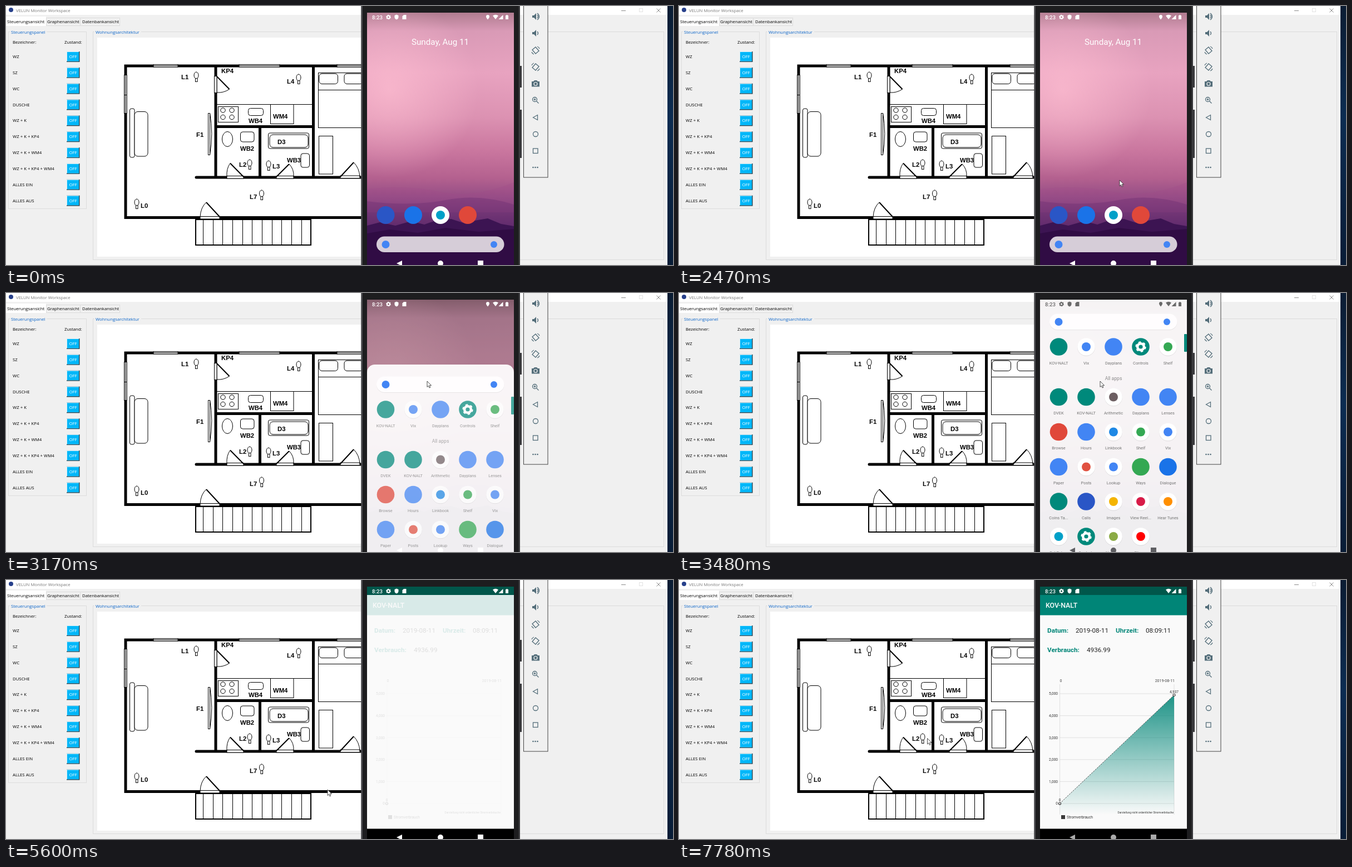
Write an HTML page that moves like this. It is 1199x467 px and loops after 8000 ms.

```html
<!DOCTYPE html>
<html lang="de">
<head>
<meta charset="utf-8">
<style>
html, body { margin: 0; width: 100%; height: 100%; overflow: hidden; background: #f0f0f0; }
svg { display: block; }
.ui { font-family: "Open Sans", sans-serif; }
.plan { font: bold 11.3px "Liberation Sans", sans-serif; }
.os { font-family: Roboto, sans-serif; }
</style>
</head>
<body>
<script>
const text = (x, y, s, size, fill = '#000', extra = '') =>
  `<text x="${x}" y="${y}" font-size="${size}" fill="${fill}" ${extra}>${s}</text>`;
const rect = (x, y, w, h, fill = 'none', extra = '') =>
  `<rect x="${x}" y="${y}" width="${w}" height="${h}" fill="${fill}" ${extra}/>`;
const circle = (x, y, r, fill = 'none', extra = '') =>
  `<circle cx="${x}" cy="${y}" r="${r}" fill="${fill}" ${extra}/>`;
const path = (d, fill = 'none', extra = '') => `<path d="${d}" fill="${fill}" ${extra}/>`;
const group = (attrs, ...parts) => `<g ${attrs}>${parts.flat().join('')}</g>`;
const range = n => [...Array(n).keys()];
const gradient = (id, y1, y2, stops) =>
  `<linearGradient id="${id}" gradientUnits="userSpaceOnUse" x1="0" x2="0" y1="${y1}" y2="${y2}">` +
  stops.map(([y, c, a = 1]) =>
    `<stop offset="${(y - y1) / (y2 - y1)}" stop-color="${c}" stop-opacity="${a}"/>`).join('') +
  '</linearGradient>';
const MIDDLE = 'text-anchor="middle"', END = 'text-anchor="end"';

function desktopWindow() {
  const rows = ['WZ', 'SZ', 'WC', 'DUSCHE', 'WZ + K', 'WZ + K + KP4', 'WZ + K + WM4',
    'WZ + K + KP4 + WM4', 'ALLES EIN', 'ALLES AUS'];
  const border = 'stroke="#dcdcdc"';
  return group('class="ui"',
    rect(0, 0, 1199, 467, '#f0f0f0'), rect(0, 0, 1189, 16, '#fff'),
    rect(1189, 0, 10, 467, 'url(#desk)'),
    circle(9, 7, 4, '#27408b'),
    text(18, 11, 'VELUN Monitor Workspace', 7.8, '#777'),
    path('M1106 8.5h8M1169.5 4.5l7 7m0-7l-7 7', 'none', 'stroke="#8a8a8a"'),
    rect(1138.5, 4.5, 6, 6, 'none', 'stroke="#e2e2e2"'),
    rect(72.5, 21.5, 61, 14, '#f0f0f0', border), rect(133.5, 21.5, 71, 14, '#f0f0f0', border),
    rect(0, 19, 72, 17, '#fff'),
    text(2, 30.5, 'Steuerungsansicht', 7.8), text(74, 30.5, 'Graphenansicht', 7.8),
    text(137, 30.5, 'Datenbankansicht', 7.8),
    rect(4.5, 46.5, 140, 319, 'none', border), rect(156.5, 46.5, 1026, 411, 'none', border),
    rect(7, 42, 66, 8, '#f0f0f0'), rect(159, 42, 84, 8, '#f0f0f0'),
    text(9, 49.5, 'Steuerungspanel', 7.8, '#0a64c8'), text(161, 49.5, 'Wohnungsarchitektur', 7.8, '#0a64c8'),
    text(12, 68, 'Bezeichner:', 7.8), text(105, 68, 'Zustand:', 7.8),
    rows.map((name, i) => {
      const y = 91 + i * 28.85;
      return text(12, y + 3, name, 7.8) + rect(109, y - 9, 23.5, 19, '#2a4a58') +
        rect(109, y - 9, 22, 17.5, '#cdeefa') + rect(110, y - 8, 21, 16.5, '#00b7f9') +
        text(120.5, y + 3, 'OFF', 7.8, '#fff', MIDDLE);
    }),
    rect(164, 57, 620, 395, '#fff'));
}

function floorPlan() {
  const lamp = ([x, y]) => `<ellipse cx="${x}" cy="${y}" rx="4" ry="6"/>` + rect(x - 1.5, y + 5.5, 3.5, 6, '#fff');
  const box = (x, y, w, h, r = 0) => rect(x, y, w, h, '#fff', `rx="${r}"`);
  const lamps = [[342, 125], [526, 129], [438, 283], [472, 285], [459.5, 338], [235, 354]];
  const labels = [['KP4', 387, 121], ['L1', 315, 132], ['L4', 505, 140], ['WB4', 436, 211], ['WM4', 480, 203],
    ['F1', 342, 236], ['WB2', 421, 261], ['D3', 488, 249], ['WB3', 505, 282], ['L2', 419, 290],
    ['L3', 479, 293], ['L7', 438, 348], ['L0', 242, 364]];
  return group('stroke="#000"',
    path('M215 108H650M215 105.5V384M212.5 381.5H650M377 108V309M377 217.5H553M456.5 217V309M552.5 108V309', 'none', 'stroke-width="5"'),
    path('M342 309H650', 'none', 'stroke-width="5" stroke-linecap="round"'),
    group('fill="#fff"',
      [[265, 44], [419, 73], [595, 60]].map(([x, w]) => box(x, 105.5, w, 4.5) + path(`M${x} 107.5h${w}`)),
      box(212.5, 124.5, 4.5, 69), path('M214.5 124v69M212 160.5h5'),
      box(374.5, 126.5, 4.5, 30), box(397, 306.5, 30, 4.5), box(486, 306.5, 31, 4.5),
      box(601, 306, 35, 4.5), box(349, 379.5, 35, 4.5)),
    path('M379 127L401.5 150M427 308L403 283.5M486 308L509 285M601 308L625 282M384 380L360 354', 'none', 'stroke-width="2"'),
    path('M401.5 150Q391 157 379 156M403 283.5Q396 293 397 308M509 285Q518 294 517 308M625 282Q635 292 636 308M360 354Q350 363 349 380'),
    group('fill="#fff"',
      box(222.5, 185, 8.5, 88, 3), box(231, 190.5, 24, 80.5, 6),
      box(363.5, 193.5, 3, 75), path('M366.5 193Q373 230 366.5 268'),
      path('M379 177.5H550'), box(381.5, 181.5, 36, 28),
      [[390, 188], [406, 188], [390, 200.5], [406, 200.5]].map(([x, y]) => circle(x, y, 4.2)),
      box(435.5, 184.5, 27, 13, 4), box(475.5, 177.5, 41.5, 35),
      box(561.5, 120.5, 90, 99), path('M561 151.5H650'), box(563, 122, 33.5, 18.5, 5), box(608, 122, 33.5, 18.5, 5),
      box(562.5, 234.5, 25, 68.5),
      '<ellipse cx="398" cy="240" rx="9.5" ry="13.5"/>', box(421.5, 227, 24.5, 18, 4),
      box(471.5, 229, 73, 28, 3), box(474, 232, 69, 23, 6), box(530, 266, 15.5, 25, 4),
      lamps.map(lamp)),
    rect(341, 385, 207, 46, '#fff', 'stroke-width="2"'),
    range(11).map(i => path(`M${354.5 + Math.round(i * 17.65)} 385V431`))) +
    group('class="plan"', labels.map(([s, x, y]) => `<text x="${x}" y="${y}">${s}</text>`));
}

const gear = (x, y, r, fill) => circle(x, y, r * .65, 'none', `stroke="${fill}" stroke-width="${r * .5}"`) +
  circle(x, y, r * .9, 'none', `stroke="${fill}" stroke-width="${r * .35}" stroke-dasharray="${r * .4712}"`);

function sideBar() {
  const speaker = y => path(`M946 ${y - 2}h3l4-4v12l-4-4h-3z`, '#546e7a');
  const turn = (y, flip) => group(`transform="translate(952 ${y}) scale(${flip} 1)" fill="none" stroke="#546e7a" stroke-width="1.3"`,
    path('M-6 -1L0 -6L6 1L0 6Z'), path('M-7 3Q-6 6 -3 7M7 -3Q6 -6 3 -7'));
  return rect(930.5, -1, 43.5, 310, '#f0f0f0', 'stroke="#444"') +
    speaker(19) + path('M955 16q3 3 0 6M955 13q7 6 0 12', 'none', 'stroke="#546e7a" stroke-width="1.4"') +
    speaker(49) + path('M955 46q3 3 0 6', 'none', 'stroke="#546e7a" stroke-width="1.4"') +
    turn(80, 1) + turn(110, -1) +
    path('M945 136h3l2-2h4l2 2h3v9.500h-14z', '#546e7a') + circle(952, 140.500, 3, '#546e7a', 'stroke="#f0f0f0" stroke-width="1.200"') +
    group('fill="none" stroke="#546e7a" stroke-width="1.3"',
      circle(950.500, 168.500, 4), path('M953.500 171.500l4 4M948.500 168.500h4M950.500 166.500v4'),
      path('M947.500 201l8-4.500v9z'), circle(952, 231, 4.500), rect(947.500, 257, 8.500, 8.500)) +
    [947.500, 951.500, 955.500].map(x => circle(x, 291, 1.3, '#546e7a')).join('');
}

const columns = [682.5, 732, 781, 830, 879];
const TEAL = '#00897b', BLUE = '#4285f4';
// Each launcher entry: label, badge colour, optional inner dot colour.
const bot = ['KOV-NALT', TEAL], vid = ['Vix', '#fff', BLUE], days = ['Dayplans', BLUE],
  tune = ['Controls', TEAL, 'gear'], shelf = ['Shelf', '#fff', '#34a853'];
const rows = [
  [97, [bot, vid, days, tune, shelf]],
  [187.5, [['DVEK', TEAL], bot, ['Arithmetic', '#fff', '#6d5f62'], days, ['Lenses', BLUE]]],
  [250.5, [['Browse', '#e0483a'], ['Hours', BLUE], ['Linkbook', '#fff', '#1e88e5'], shelf, vid]],
  [313.5, [['Paper', BLUE], ['Posts', '#fff', '#e15241'], ['Lookup', '#fff', BLUE], ['Ways', '#34a853'], ['Dialogue', '#1a73e8']]],
  [376, [['Coins Ta...', TEAL], ['Calls', '#2a56c6'], ['Images', '#fff', '#f4b400'], ['View Reel...', '#fff', '#d81b48'], ['Hear Tunes', '#fff', '#ff8f00']]],
  [439, [['Get Extras', '#fff', '#00a0c8'], tune, ['Netpane', '#fff', '#8bab45'], ['Clipvue', '#fff', '#f00']]]
];

function launcherIcon([label, badge, dot], x, y, id = '') {
  const inner = dot === 'gear' ? gear(x, y, 9, '#fff') : dot ? circle(x, y, 8, dot) : '';
  const shade = badge === '#fff' ? circle(x, y + .7, 16, '#000', 'opacity=".1"') : '';
  return group(id, shade, circle(x, y, 15.8, badge), inner,
    text(x, y + 31.5, label, 7.4, '#757575', MIDDLE));
}

function home() {
  const dock = ['#2a56c6', '#1a73e8', '#fff', '#e0483a'];
  return rect(649, 12, 264, 455, 'url(#sky)') + rect(649, 12, 264, 455, 'url(#glow)') +
    path('M649 330Q720 322 780 335T913 318V372H649Z', '#a04a86', 'opacity=".25"') +
    path('M649 352Q730 362 790 350T913 358V400H649Z', '#6d2f70', 'opacity=".4"') +
    path('M649 396L672 390L700 396L728 388L752 394L775 386L800 384L822 391L848 386L866 383L890 393L913 397V467H649Z', '#3c1452') +
    path('M649 410L690 403L740 409L790 400L850 407L913 402V467H649Z', '#2d0b42', 'opacity=".8"') +
    rect(649, 12, 264, 455, '#000', 'id="scrim"') +
    group('id="date"', text(780.5, 70, 'Sunday, Aug 11', 15.2, '#fff', MIDDLE)) +
    group('id="dock"', dock.map((c, i) => circle(columns[i], 377, 16, c)), circle(columns[2], 377, 8, '#00a0c8'));
}

function drawer() {
  return rect(649, 12, 264, 520, '#fff', 'id="panel"') +
    group('id="search"', rect(666, 38.5, 229.500, 28.500, '#000', 'rx="14.250" opacity=".07"'),
      rect(666, 37.500, 229.500, 28.500, '#fff', 'rx="14.250" id="pill"'),
      circle(682.500, 52, 7, BLUE), circle(877, 52, 6, BLUE)) +
    group('id="apps"', rows.map(([y, list], r) =>
      list.map((app, c) => launcherIcon(app, columns[c], y, r + c ? '' : 'id="first"'))),
      text(781, 156.5, 'All apps', 8.6, '#8a8a8a', MIDDLE), rect(908, 74, 5, 32, TEAL, 'rx="1"'));
}

function app() {
  const ys = range(6).map(i => 403 - i * 39.6);
  return rect(649, 12, 264, 455, '#fafafa') + rect(649, 12, 264, 15, '#00574b') + rect(649, 448.5, 264, 19, '#000') +
    group('id="content"',
      rect(649, 27, 264, 36.5, '#008577'),
      text(659, 50, 'KOV-NALT', 12.4, '#fff', 'font-weight="500"'),
      group('font-weight="700"', text(662, 95, 'Datum:', 11.8, '#008577'), text(785, 95, 'Uhrzeit:', 11.8, '#008577'),
        text(662, 130, 'Verbrauch:', 11.8, '#008577')),
      text(713, 95, '2019-08-11', 11.7, '#222'), text(839, 95, '08:09:11', 11.7, '#222'), text(733, 130, '4936.99', 11.7, '#222'),
      text(686.5, 183.5, '0', 7, '#444', MIDDLE), text(891, 183.5, '2019-08-11', 7, '#444', END),
      ys.map((y, i) => path(`M684 ${y}H890`, 'none', 'stroke="#d4d4d4" stroke-width=".7"') +
        text(681, y + 2.3, i ? i + ',000' : '0', 6.5, '#333', END)),
      path('M684.5 188V423M890 188V423', 'none', 'stroke="#d4d4d4" stroke-width=".7"'),
      path('', 'url(#fill)', 'id="area"'),
      path('', 'none', 'id="line" stroke="#444" stroke-width=".9" stroke-dasharray="3 1.6"'),
      circle(684.5, 403, 2, '#fff', 'stroke="#333" stroke-width="1.2"'), text(684.5, 398.500, '0', 6.5, '#333', MIDDLE),
      group('id="peak"', circle(890, 0, 2, '#fff', 'stroke="#333" stroke-width="1.2"'), text(890, -4, '4,937', 6.5, '#333', MIDDLE)),
      text(889, 421, 'Darstellung nicht ordentlicher Stromverbräuche', 4.8, '#333', END),
      rect(687, 424, 7, 7, '#3a3a3a'), text(697, 430, 'Stromverbrauch', 6.6, '#333'));
}

function statusBar() {
  return group('id="status" fill="currentColor" class="os"',
    text(658, 23.5, '8:23', 9.6, 'currentColor', 'font-weight="500"'),
    gear(687.5, 20, 4, 'currentColor'),
    path('M702 15.500l3.500 1.500v3q0 3-3.500 4.500q-3.500-1.500-3.500-4.500v-3z', 'currentColor'),
    path('M715 16h4.500v8h-7v-5.500z', 'currentColor'),
    group('id="pin"', path('M866 24.500q-3-3.500-3-5.500a3 3 0 0 1 6 0q0 2-3 5.500z', 'currentColor')),
    path('M875 17.500q5-3.500 10 0l-5 6.500z', 'currentColor'), path('M893.500 16v8h-8z', 'currentColor'),
    path('M898 17h1.500v-1h2v1h1.500v7h-5z', 'currentColor')) +
    group('id="nav"', path('M702 464l10-5v10z', 'currentColor'), circle(781, 464, 5, 'currentColor'), rect(848, 459, 10, 10, 'currentColor'));
}

document.body.innerHTML = `<svg width="1199" height="467" viewBox="0 0 1199 467"><defs>
${gradient('desk', 0, 467, [[0, '#0a1c33'], [200, '#0b2c52'], [467, '#081c36']])}
${gradient('sky', 12, 467, [[12, '#b07c90'], [45, '#d99ab6'], [120, '#e8a3c0'], [200, '#dc92b2'],
    [260, '#ca779f'], [310, '#b4618f'], [350, '#8f4a84'], [395, '#5d2c6c'], [467, '#2b0a3f']])}
<radialGradient id="glow" gradientUnits="userSpaceOnUse" cx="690" cy="150" r="160">
<stop stop-color="#ffbfd2" stop-opacity=".7"/><stop offset="1" stop-color="#ffbfd2" stop-opacity="0"/></radialGradient>
${gradient('fill', 190, 423, [[190, '#008577', .95], [423, '#008577', 0]])}
<clipPath id="screen">${rect(649, 12, 264, 455)}</clipPath>
<clipPath id="reveal">${rect(0, 0, 1, 1, '#000', 'id="window"')}</clipPath></defs>
${desktopWindow()}${floorPlan()}
${rect(924, 108, 3, 39, '#3a3a3d')}${rect(924, 187, 3, 87, '#3a3a3d')}
${rect(638.5, -4, 285.5, 475, '#1d1d1f')}${rect(638.5, -4, 2.5, 475, '#4a4a4e')}${rect(921.5, -4, 2.5, 475, '#3a3a3d')}
<g clip-path="url(#screen)" class="os">${home()}${drawer()}
<g id="app" clip-path="url(#reveal)">${app()}</g>${circle(0, 0, 15.8, TEAL, 'id="launch"')}${statusBar()}</g>
${sideBar()}
${path('M0 0V10.500L2.400 8.300L4 12L5.800 11.200L4.200 7.700H7.500Z', '#fff', 'id="cursor" stroke="#222" stroke-width=".8"')}</svg>`;

const LOOP = 8000;
// Bursts of picture changes: first time, last time, number of steps.
const bursts = [[0, 0, 1], [1450, 1450, 1], [1680, 2470, 11], [2550, 2620, 2], [2790, 3480, 10], [3600, 3950, 5],
  [4270, 5050, 11], [5120, 5900, 11], [6220, 6220, 1], [6460, 7240, 11], [7320, 7470, 3], [7620, 7780, 3]];
const ticks = bursts.flatMap(([a, b, n]) => range(n).map(i => Math.round((a + (b - a) * i / Math.max(1, n - 1)) / 10) * 10));

const cursorKeys = [[1450, 857, 460], [1680, 853, 448], [1910, 800, 400], [2140, 756, 352], [2320, 772, 328],
  [2470, 792, 314], [2550, 786, 308], [2620, 784, 306], [2790, 781, 292], [2940, 770, 235], [3100, 759, 172],
  [3170, 757, 159], [3480, 757, 159], [3600, 740, 172], [3770, 694, 210], [3950, 678, 104], [4270, 674, 112],
  [4580, 640, 215], [4890, 601.500, 326.500], [5050, 578, 378], [7470, 578, 378], [7620, 540, 352], [7700, 490, 312], [7780, 446.500, 285.500]];
const drawerKeys = [[2620, 378], [2790, 360], [2940, 265], [3100, 165], [3170, 113], [3250, 62], [3330, 25], [3400, 6], [3480, 0], [3600, -.7]];
const launchKeys = [[4890, 0], [4970, .2], [5050, .58], [5120, .85], [5200, 1]];
const fadeKeys = [[5440, 0], [5600, .14], [5750, .5], [5900, 1]];
const chartKeys = [[6385, 0], [7365, 1]];

function sample(keys, t) {
  const next = keys.findIndex(k => k[0] > t);
  if (next === 0) return keys[0].slice(1);
  if (next < 0) return keys[keys.length - 1].slice(1);
  const a = keys[next - 1], b = keys[next], f = (t - a[0]) / (b[0] - a[0]);
  return a.slice(1).map((v, i) => v + (b[i + 1] - v) * f);
}

const clamp = v => Math.min(1, Math.max(0, v));
const mix = (a, b, k) => a + (b - a) * k;
const $ = id => document.getElementById(id);
const set = (id, attrs) => { for (const k in attrs) $(id).setAttribute(k, attrs[k]); };
const show = (id, on) => set(id, { visibility: on ? 'visible' : 'hidden' });

function draw(t) {
  const [cx, cy] = sample(cursorKeys, t);
  show('cursor', t >= 1450);
  set('cursor', { transform: `translate(${cx} ${cy})` });

  const [offset] = sample(drawerKeys, t), p = clamp(1 - offset / 378);
  const shift = `translate(0 ${offset})`;
  set('scrim', { opacity: .36 * p });
  set('date', { opacity: clamp(1 - p * 2.5) });
  set('dock', { opacity: clamp(1 - p * 3), transform: `translate(0 ${offset - 378})` });
  set('panel', { opacity: .93 * clamp(p * 3), y: 12 + Math.max(0, offset) * 1.035, rx: 14 * clamp(offset / 60) });
  set('search', { transform: shift });
  set('pill', { fill: `rgb(${mix(214, 255, clamp(p * 2))},${mix(205, 253, clamp(p * 2))},${mix(216, 254, clamp(p * 2))})` });
  set('apps', { transform: shift, opacity: clamp((p - .2) / .7) });

  const opening = t >= 4890, [k] = sample(launchKeys, t);
  show('first', !opening);
  show('app', t >= 4970);
  set('window', { x: mix(667, 649, k), y: mix(89, 12, k), width: mix(32, 264, k), height: mix(32, 455, k), rx: mix(16, 0, k) });
  show('launch', opening && k < 1);
  set('launch', { transform: `translate(${mix(683.5, 781, k)} ${mix(105, 240, k)}) scale(${1.19 + 1.8 * k})`, opacity: clamp(1.2 - k * 1.2) });
  set('content', { opacity: sample(fadeKeys, t)[0] });

  const [rise] = sample(chartKeys, t), y = 403 - 195.5 * rise;
  for (const id of ['area', 'line', 'peak']) show(id, rise > 0 && t >= 6460);
  set('area', { d: `M684.5 403L890 ${y}V423H684.5Z` });
  set('line', { d: `M684.5 403L890 ${y}` });
  set('peak', { transform: `translate(0 ${y})` });

  const onDrawer = t >= 3250 && t < 5120;
  show('pin', t < 3600);
  set('status', { color: onDrawer ? '#6a6a6a' : '#fff' });
  set('nav', { color: onDrawer ? '#5f5f63' : t >= 6220 ? '#aaa' : '#fff' });
}

let last = -1;
function frame() {
  const now = performance.now() % LOOP;
  const t = ticks.filter(x => x <= now).pop();
  if (t !== last) draw(last = t);
  requestAnimationFrame(frame);
}
frame();
</script>
</body>
</html>
```
